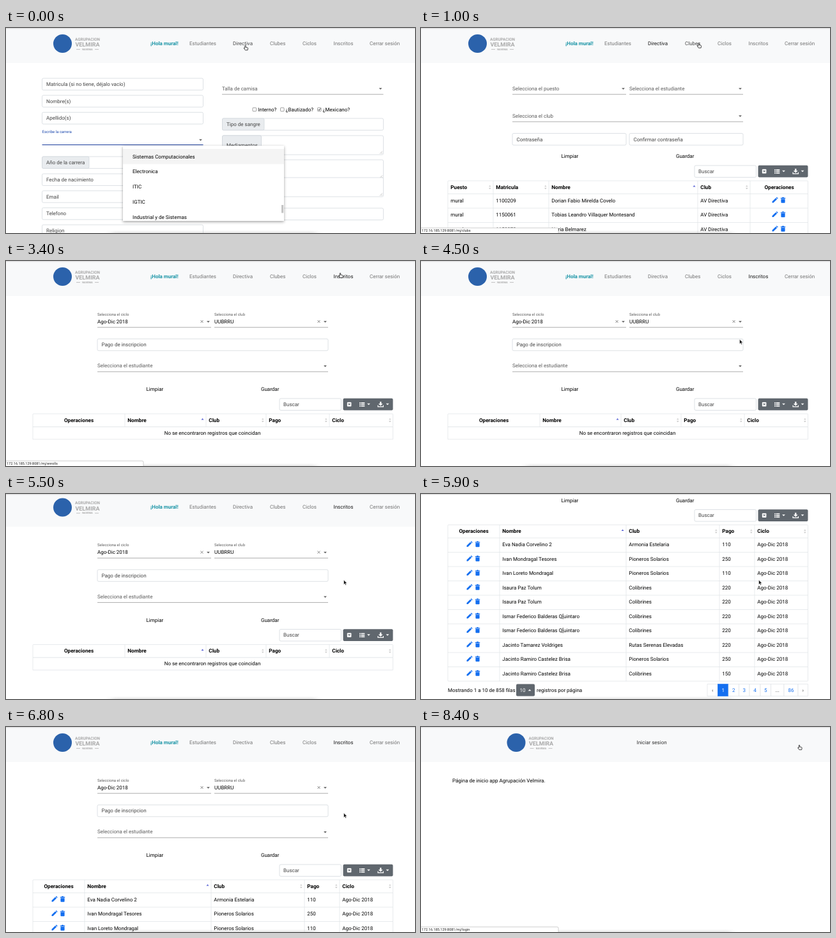
Recreate the animation shown at these times as an HTML page. Size 640 by 322 pixels, loop 8.7 s.

```html
<!DOCTYPE html>
<html lang="es">
<head>
<meta charset="utf-8">
<title>Panel de inscripciones</title>
<style>
html, body { margin: 0; width: 100%; height: 100%; overflow: hidden; background: #fff; }
svg { display: block; width: 100vw; height: 100vh; font: 8px Roboto, sans-serif; }
text { white-space: pre; text-rendering: geometricPrecision; }
</style>
</head>
<body>
<svg id="stage" viewBox="0 0 640 322"></svg>
<script>
const LOOP = 8700, STEP = 100;
const BLUE = '#146ff0', SLATE = '#60676e', LINE = '#dee2e6', GRAY = '#5c5c5c', INK = '#000';

// Drawing helpers; the y of a text is its vertical middle.
const text = (x, y, s, { fill = INK, size = 8, weight = 400, anchor = 'start' } = {}) =>
  `<text x="${x}" y="${y + size * .33}" fill="${fill}" font-size="${size}" font-weight="${weight}" text-anchor="${anchor}">${s}</text>`;
const rect = (x, y, w, h, fill, stroke = 'none', r = 0) =>
  `<rect x="${x}" y="${y}" width="${w}" height="${h}" fill="${fill}" stroke="${stroke}" stroke-width=".7" rx="${r}"/>`;
const path = (d, fill, stroke = 'none', width = .7) =>
  `<path d="${d}" fill="${fill}" stroke="${stroke}" stroke-width="${width}"/>`;
const line = (x1, y1, x2, y2, color = LINE, width = .7) =>
  path(`M${x1} ${y1}L${x2} ${y2}`, 'none', color, width);
const caret = (x, y, color = GRAY, s = 1) =>
  path(`M${x - 2.4} ${y - 1.2 * s}h4.8l-2.4 ${2.5 * s}z`, color);
const bold = (x, y, s, anchor) => text(x, y, s, { weight: 700, size: 8.2, anchor });

const input = (x, y, w, label, h = 18.5) =>
  rect(x, y, w, h, '#fff', '#ced4da', 2) + text(x + 6.5, y + 9.4, label, { fill: '#444' });
const addon = (x, y, w, total, label, h = 18.5) =>
  rect(x, y, total, h, '#fff', '#ced4da', 2) + rect(x, y, w, h, '#e9ecef', '#ced4da', 2) +
  text(x + 6.5, y + h / 2, label, { fill: '#444' });
const select = (x, y, right, label, value) =>
  (value
    ? text(x, y - 11, label, { fill: GRAY, size: 6 }) + text(x, y, value) +
      path(`M${right - 16.5} ${y - 2}l4 4m0 -4l-4 4`, 'none', '#555')
    : text(x, y, label, { fill: GRAY })) +
  caret(right - 4.5, y + .5) + line(x, y + 9.2, right, y + 9.2, '#8a8a8a');
const textarea = y => rect(338.5, y, 252, 30, '#fff', '#ced4da', 2) +
  path(`M585 ${y + 28.5}l4 -4m-1.5 4l1.5 -1.5`, 'none', '#888', .5);

const actions = text(219.5, 201.5, 'Limpiar') + text(399, 201.5, 'Guardar');
const toolbar = rect(428, 216, 96.5, 18.5, '#fff', '#ced4da', 2) +
  text(434, 225.3, 'Buscar', { fill: '#444' }) +
  rect(527.5, 215.7, 78, 18.8, SLATE, 'none', 2) +
  rect(533.8, 221.8, 6.6, 6.6, '#fff', 'none', 1) + caret(537.1, 225, SLATE, .9) +
  [0, 1, 2].map(i => rect(553, 222 + i * 2.5, 1.7, 1.6, '#fff') + rect(555.5, 222 + i * 2.5, 5.8, 1.6, '#fff')).join('') +
  caret(567.5, 225, '#fff') +
  path('M585 221h2.4v3h2.2l-3.4 3.4l-3.4 -3.4h2.2z', '#fff') + path('M582 226.5v2.3h8.4v-2.3', 'none', '#fff', 1.2) +
  caret(597, 225, '#fff');

const editIcons = (x, y) =>
  path(`M${x - 11} ${y + 4.3}v-2l5.6 -5.6l2 2l-5.6 5.6zM${x - 4.8} ${y - 3.9}l1 -1l2 2l-1 1z`, BLUE) +
  path(`M${x + 2.3} ${y - 3.6}h2l.6 -.9h2.2l.6 .9h2v1.3h-7.4zM${x + 2.9} ${y - 1.8}h6.2v5.3q0 1 -1 1h-4.2q-1 0 -1 -1z`, BLUE);

// Column edges and titles; cells equal to null hold the edit icons.
function table(edges, titles, rows, sorted) {
  const top = 240, head = 20.5, rowH = 22.5;
  const bottom = top + head + rows.length * rowH;
  let out = rect(42, top, 563.5, bottom - top, '#fff', LINE, 1);
  titles.forEach((title, i) => {
    const x = edges[i], right = edges[i + 1], mid = (x + right) / 2;
    if (i) out += line(x, top, x, bottom);
    if (title === 'Operaciones') out += bold(mid, 250, title, 'middle');
    else out += bold(x + 4.3, 250, title) + (title === sorted
      ? path(`M${right - 7.5} 249.5h4l-2 -2.6z`, '#5b64d6')
      : path(`M${right - 7} 249.3h3.6l-1.8 -2.4zM${right - 7} 251h3.6l-1.8 2.4z`, '#ccc'));
    rows.forEach((row, r) => {
      const y = top + head + rowH * r + 10.6;
      out += row[i] === null ? editIcons(mid, y - .8) : text(x + 4.3, y, row[i]);
    });
  });
  rows.forEach((_, r) => out += line(42, top + head + r * rowH, 605.5, top + head + r * rowH));
  return out;
}

function studentPage() {
  let out = ['Matricula (si no tiene, déjalo vacío)', 'Nombre(s)', 'Apellido(s)']
    .map((s, i) => input(56.5, 79 + i * 26.7, 252, s)).join('');
  out += text(56.5, 163, 'Escribe la carrera', { fill: '#1a47ad', size: 6 }) +
    line(56.5, 183.5, 308.5, 183.5, '#1a3c9c', 1.1) + caret(304.5, 176);
  out += addon(56.5, 202, 73.5, 252, 'Año de la carrera');
  out += ['Fecha de nacimiento', 'Email', 'Telefono', 'Religion']
    .map((s, i) => input(56.5, 229 + i * 26.7, 252, s)).join('');
  out += select(338, 95, 590.5, 'Talla de camisa');
  [[386, 'Interno?'], [429.5, '¿Bautizado?'], [487.5, '¿Mexicano?']].forEach(([x, s], i) => {
    out += rect(x, 125.2, 5.6, 5.6, '#fff', '#777', 1) + text(x + 8.3, 128, s);
    if (i === 2) out += path(`M${x + 1.2} 128l1.3 1.5l2.2 -3.2`, 'none', '#222', .9);
  });
  out += addon(338.5, 142, 65.5, 252, 'Tipo de sangre') + textarea(169) +
    addon(338.5, 169, 61, 61, 'Mediamentos', 30) + textarea(207) + textarea(235) + input(338.5, 283, 252, '');
  out += `<g filter="url(#lift)">${rect(183, 185, 252, 118, '#fff')}</g>` + rect(183, 190, 252, 23.7, '#f4f4f4');
  out += '<g clip-path="url(#menu)">' +
    ['Sistemas Computacionales', 'Electronica', 'ITIC', 'IGTIC', 'Industrial y de Sistemas']
      .map((s, i) => text(198, 202 + i * 23.8, s)).join('') + '</g>';
  return out + rect(431, 278, 3.2, 12.5, '#c4c4c4');
}

const boardPage = () =>
  select(143, 95, 321, 'Selecciona el puesto') + select(326, 95, 504, 'Selecciona el estudiante') +
  select(143, 138, 504, 'Selecciona el club') +
  input(143, 165.5, 178, 'Contraseña') + input(326, 165.5, 178, 'Confirmar contraseña') + actions + toolbar +
  table([42, 113, 200, 433, 515, 606], ['Puesto', 'Matricula', 'Nombre', 'Club', 'Operaciones'], [
    ['mural', '1100209', 'Dorian Fabio Mirelda Covelo', 'AV Directiva', null],
    ['mural', '1150061', 'Tobias Leandro Villaquer Montesand', 'AV Directiva', null],
    ['mural', '1150373', 'Nuria Belmarez', 'AV Directiva', null]], 'Nombre');

const clubPage = () => input(143, 165.5, 361, 'Nombre del club') + actions + toolbar +
  table([42, 433, 606], ['Nombre', 'Operaciones'],
    ['Armonia Estelaria', 'Colibrines', 'Pioneros Solarios'].map(s => [s, null]), 'Nombre');

const cyclePage = () => input(143, 165.5, 361, 'Nombre del ciclo') + actions + toolbar +
  table([42, 433, 606], ['Ciclo', 'Operaciones'], [['Ago-Dic 2018', null]], 'Ciclo');

const enrolled = [
  ['Eva Nadia Corvelino 2', 'Armonia Estelaria', 110],
  ['Ivan Mondragal Tesores', 'Pioneros Solarios', 250],
  ['Ivan Loreto Mondragal', 'Pioneros Solarios', 110],
  ['Isaura Paz Tolum', 'Colibrines', 220],
  ['Isaura Paz Tolum', 'Colibrines', 220],
  ['Ismar Federico Balderas Q[uintaro', 'Colibrines', 220],
  ['Ismar Federico Balderas Q[uintaro', 'Colibrines', 220],
  ['Jacinto Tamarez Voldriges', 'Rutas Serenas Elevadas', 220],
  ['Jacinto Ramiro Castelez Brisa', 'Pioneros Solarios', 250],
  ['Jacinto Ramiro Castelez Brisa', 'Colibrines', 150]
].map(row => [null, ...row, 'Ago-Dic 2018']);

function pager() {
  const y = 499.5, labels = ['‹', 1, 2, 3, 4, 5, '...', 86, '›'];
  const edges = [448, 464.5, 481, 497.5, 514, 531, 547.5, 568, 590, 605.5];
  return text(42, y, 'Mostrando 1 a 10 de 858 filas') + rect(149, y - 9.5, 29, 19, SLATE, 'none', 2) +
    text(154.5, y, '10', { fill: '#fff' }) + caret(170, y, '#fff', -1) + text(181, y, 'registros por página') +
    labels.map((s, i) => {
      const active = s === 1, fill = active ? '#fff' : isNaN(s) ? '#333' : BLUE;
      return rect(edges[i], y - 9.3, edges[i + 1] - edges[i], 18.6, active ? BLUE : '#fff', active ? BLUE : LINE) +
        text((edges[i] + edges[i + 1]) / 2, y, s, { anchor: 'middle', fill });
    }).join('');
}

function enrollPage(loaded) {
  const titles = ['Operaciones', 'Nombre', 'Club', 'Pago', 'Ciclo'];
  return select(143, 95, 321, 'Selecciona el ciclo', 'Ago-Dic 2018') +
    select(326, 95, 504, 'Selecciona el club', 'UUBRRU') + input(143, 122.3, 361, 'Pago de inscripcion') +
    select(143, 164.7, 504, 'Selecciona el estudiante') + actions + toolbar +
    (loaded
      ? table([42, 123, 321, 467, 522, 606], titles, enrolled, 'Nombre') + pager()
      : table([42, 186, 313, 407, 506, 606], titles, [], 'Nombre') +
        rect(42, 260.5, 563.5, 19.5, '#fff', LINE) +
        text(323, 270, 'No se encontraron registros que coincidan', { anchor: 'middle' }));
}

const homePage = () => text(49, 84.5, 'Página de inicio app Agrupación Velmira.');

// Timelines: [time, value...].
const pages = [[0, studentPage, -1], [200, boardPage, 1], [1100, clubPage, 2], [2000, cyclePage, 3],
  [3100, () => enrollPage(false), 4], [5600, () => enrollPage(true), 4], [8300, homePage, -1]];
const links = [[0, ''], [700, 'clubs'], [1800, 'cycles'], [2600, 'enrolls'], [4200, ''], [8200, 'login']];
const pointer = [[0, 374.5, 27], [300, 374.5, 27], [900, 434.5, 23.5], [1400, 434.5, 23.5], [2200, 477, 19],
  [2300, 477, 19], [2900, 523, 18.5], [3800, 523, 18.5], [4300, 512, 90], [4700, 485, 156], [5100, 528.5, 135],
  [7100, 528.5, 135], [7500, 604, 52], [7700, 602, 34], [7900, 592, 28]];
const scroll = [[5400, 0], [5500, 3.5], [5600, 48], [5700, 120], [5800, 175], [5900, 191.5], [6000, 183],
  [6100, 110], [6200, 28], [6300, -6], [6400, -7], [6500, -5], [6800, 0]];

const current = (track, t) => track.filter(k => k[0] <= t).pop();
function tween(track, t) {
  const next = track.findIndex(k => k[0] > t);
  if (next <= 0) return track.at(next).slice(1);
  const a = track[next - 1], b = track[next], p = (t - a[0]) / (b[0] - a[0]);
  return a.slice(1).map((v, i) => v + (b[i + 1] - v) * p);
}

const nav = [[287, 'Estudiantes', 42], [355, 'Directiva', 32], [413, 'Clubes', 26], [464, 'Ciclos', 22],
  [512.5, 'Inscritos', 31], [569, 'Cerrar sesión', 48]];

function logo(dx) {
  const wordmark = { fill: '#aaa', weight: 700, anchor: 'middle' };
  return `<g transform="translate(${dx})"><circle cx="88.5" cy="24.5" r="14.5" fill="#2b62ab"/>` +
    text(127.5, 17.7, 'AGRUPACION', { ...wordmark, size: 6.3 }) +
    text(127.5, 26.3, 'VELMIRA', { ...wordmark, size: 9 }) +
    text(127.5, 33.6, 'NAVEMA', { ...wordmark, size: 4 }) +
    line(110, 33.6, 116, 33.6, '#aaa') + line(139, 33.6, 145, 33.6, '#aaa') + '</g>';
}

function header(active, home, [px, py]) {
  const bar = rect(0, -20, 640, 75, '#f8f9fa');
  if (home) return bar + logo(60.5) + text(337.5, 24, 'Iniciar sesion', { fill: '#333' });
  return bar + logo(0) + text(226, 24, '¡Hola mural!', { fill: '#1793a5', weight: 700 }) +
    nav.map(([x, s, w], i) => {
      const hover = py < 30 && px >= x && px <= x + w;
      return text(x, 24, s, { fill: i === active ? '#1a1a1a' : hover ? '#4a4a4a' : '#757575' });
    }).join('');
}

function cursor([x, y]) {
  const hand = y < 30;
  const shape = hand
    ? path('M-.8 .9q.8 -1.2 1.6 0v2.8l3.1 .7q1 .3 .9 1.3l-.6 3.3h-4.4l-2.6 -3.6q.3 -1.2 2 .2z', '#fff', '#111', .9)
    : path('M0 0v7.2l1.7 -1.5l1.1 2.6l1.2 -.5l-1.1 -2.5h2.2z', '#111', '#fff', .5);
  return `<g transform="translate(${x} ${y}) scale(${hand ? .86 : 1})">${shape}</g>`;
}

const statusBar = link => link &&
  rect(-2, 314, 217, 12, '#fff', '#bbb', 2) + text(1, 318.3, '172.16.185.129:8081/mj/' + link, { size: 5.55, fill: '#222' });

const defs = `<defs>
  <filter id="lift" x="-10%" y="-10%" width="120%" height="125%"><feDropShadow dx="0" dy="1.5" stdDeviation="2.2" flood-opacity=".38"/></filter>
  <filter id="soft" x="-10%" y="-150%" width="120%" height="400%"><feGaussianBlur stdDeviation="6 2"/></filter>
  <clipPath id="menu"><rect x="183" y="185" width="252" height="118"/></clipPath></defs>`;

function render(t) {
  const [, page, active] = current(pages, t);
  const point = tween(pointer, t), [offset] = tween(scroll, t);
  return defs + rect(0, 0, 640, 322, '#fff') +
    `<g transform="translate(0 ${-offset})">${header(active, page === homePage, point)}${page()}</g>` +
    rect(0, 0, 640, 1.3, '#dcdcdc') +
    `<g filter="url(#soft)" opacity=".3">${rect(165, 321, 320, 6, '#777')}</g>` +
    statusBar(current(links, t)[1]) + cursor(point);
}

const stage = document.getElementById('stage');
let shown = -1;
function tick() {
  const t = Math.floor(performance.now() % LOOP / STEP) * STEP;
  if (t !== shown) stage.innerHTML = render(shown = t);
  requestAnimationFrame(tick);
}
tick();
</script>
</body>
</html>
```
